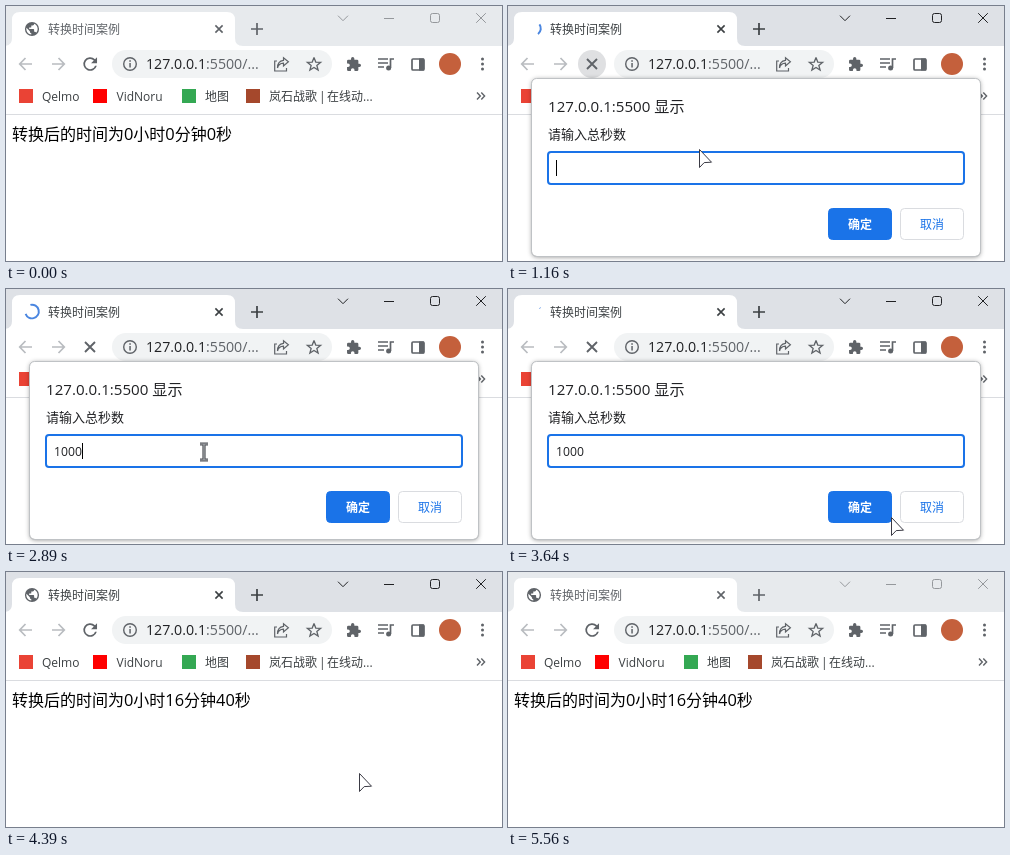
Animation of 496x255 px, one loop 5620 ms. Source, as an HTML page with a canvas:

```html
<!DOCTYPE html>
<html lang="zh-CN">
<head>
<meta charset="utf-8">
<title>转换时间案例</title>
<style>
html, body { margin: 0; width: 100%; height: 100%; overflow: hidden; background: #fff; }
canvas { display: block; width: 496px; height: 255px; }
</style>
</head>
<body>
<canvas id="stage" width="496" height="255"></canvas>
<script>
const c = document.getElementById('stage').getContext('2d');
const LOOP = 5620;
const FONT = '"Open Sans", "Noto Sans CJK SC", "Noto Sans CJK", sans-serif';
const GREY = '#5f6368', DARK = '#202124', BLUE = '#1a73e8', PALE = '#b9bcc0';

// Event times in ms
const AT = { hover: 740, active: 810, load: 930, dialog: 1000, leave: 1300, done: 4290, blur: 5560 };
const KEYS = [2150, 2330, 2520, 2700];
const CLICKS = [[790, 920], [4090, 4230]];

// Pointer path: time, x, y
const PATH = [
  [140, 428, 256], [300, 335, 190], [450, 170, 100], [590, 55, 53], [670, 56, 54],
  [760, 80, 58], [930, 80, 58], [1050, 122, 92], [1160, 191, 143], [1280, 197, 159],
  [1400, 198, 163], [3030, 198, 163], [3220, 270, 180], [3420, 370, 218], [3570, 396, 236],
  [3640, 383, 228], [3850, 364, 214], [4200, 355, 209], [4390, 353, 201], [4770, 349, 205],
  [5000, 349, 205], [5180, 384, 226], [5370, 434, 257]
];

// Icons on a 24-unit grid
const GLOBE = new Path2D('M12 2a10 10 0 1 0 0 20 10 10 0 1 0 0-20z' +
  'M11 19.9C7 19.4 4 16.1 4 12q0-.9.2-1.8L9 15v1q0 2 2 2z' +
  'M17.9 17.4Q17.4 16 16 16h-1v-3q0-1-1-1H8v-2h2q1 0 1-1V7h2q2 0 2-2v-.4C18 5.8 20 8.6 20 12q0 3-2.1 5.4z');
const RELOAD = new Path2D('M17.65 6.35A8 8 0 1 0 19.73 14h-2.08A6 6 0 1 1 16.22 7.78L13 11h7V4z');
const PUZZLE = new Path2D('M20.5 11H19V7q0-2-2-2h-4V3.5a2.5 2.5 0 0 0-5 0V5H4Q2 5 2 7v3.8h1.5' +
  'a2.7 2.7 0 0 1 0 5.4H2V20q0 2 2 2h3.8v-1.5a2.7 2.7 0 0 1 5.4 0V22H17q2 0 2-2v-4h1.5a2.5 2.5 0 0 0 0-5z');

const within = (t, a, b) => t >= a && t < b;

function text(s, x, y, size, color, weight = 400, align = 'left') {
  c.font = `${weight} ${size}px ${FONT}`;
  c.fillStyle = color;
  c.textAlign = align;
  c.fillText(s, x, y);
  return c.measureText(s).width;
}

function rect(x, y, w, h, color) {
  c.fillStyle = color;
  c.fillRect(x, y, w, h);
}

function round(x, y, w, h, r) {
  c.beginPath();
  c.roundRect(x, y, w, h, r);
}

function disc(x, y, r, color) {
  c.beginPath();
  c.arc(x, y, r, 0, Math.PI * 2);
  c.fillStyle = color;
  c.fill();
}

function icon(path, x, y, size) {
  c.save();
  c.translate(x, y);
  c.scale(size / 24, size / 24);
  c.translate(-12, -12);
  c.fillStyle = GREY;
  c.fill(path, 'evenodd');
  c.restore();
}

// Each polyline is [x, y, x, y, ...]
function trace(lines) {
  c.beginPath();
  for (const p of lines) {
    c.moveTo(p[0], p[1]);
    for (let i = 2; i < p.length; i += 2) c.lineTo(p[i], p[i + 1]);
  }
}

function stroke(color, width, ...lines) {
  trace(lines);
  c.strokeStyle = color;
  c.lineWidth = width;
  c.stroke();
}

function arc(x, y, r, from, to, color, width) {
  c.beginPath();
  c.arc(x, y, r, from, to);
  c.strokeStyle = color;
  c.lineWidth = width;
  c.stroke();
}

function cross(x, y, r, color, width) {
  stroke(color, width, [x - r, y - r, x + r, y + r], [x + r, y - r, x - r, y + r]);
}

// cubic-bezier(.4, 0, .2, 1)
function ease(p) {
  let lo = 0, hi = 1;
  for (let i = 0; i < 16; i++) {
    const u = (lo + hi) / 2, v = 1 - u;
    if (1.2 * u * v * v + .6 * u * u * v + u * u * u < p) lo = u; else hi = u;
  }
  return lo * lo * (3 - 2 * lo);
}

// Arc that grows and shrinks while it turns
function spinner(t) {
  const e = 2190 + (t - 1160) * .965, span = 666, max = 270;
  const start = 270 + e * 360 / 1568 + Math.floor(e / (span * 2)) % 4 * max;
  let sweep = max * ease((e % span) / span);
  if (Math.floor(e / span) % 2 === 0) sweep = Math.min(sweep - max, -5);
  else sweep = Math.max(sweep, 5);
  const rad = Math.PI / 180;
  const a = start * rad, b = (start + sweep) * rad;
  arc(26, 22.5, 6.8, Math.min(a, b), Math.max(a, b), '#4a86e0', 2);
}

function tabStrip(t, active, loading) {
  rect(0, 0, 496, 40, active ? '#dee1e6' : '#e7eaed');
  c.beginPath();
  c.moveTo(-2, 40);
  c.quadraticCurveTo(6, 40, 6, 32);
  c.lineTo(6, 14);
  c.quadraticCurveTo(6, 6, 14, 6);
  c.lineTo(221, 6);
  c.quadraticCurveTo(229, 6, 229, 14);
  c.lineTo(229, 32);
  c.quadraticCurveTo(229, 40, 237, 40);
  c.fillStyle = '#fff';
  c.fill();

  if (loading) spinner(t); else icon(GLOBE, 26, 23, 17);
  text('转换时间案例', 42, 27.5, 12, active ? '#3c4043' : GREY);
  cross(213, 23, 3.6, active ? '#3c4043' : GREY, 1.6);
  stroke(active ? '#3c4043' : GREY, 1.7, [245, 23, 257, 23], [251, 17, 251, 29]);

  const ink = active ? DARK : '#95989c';
  stroke(ink, 1, [332, 9.7, 337, 14.7, 342, 9.7]);
  stroke(ink, 1, [378, 12.5, 388, 12.5]);
  round(424.5, 7.5, 9, 9, 2);
  c.stroke();
  cross(475, 12, 4.8, ink, 1);
}

function arrow(x, dir) {
  stroke(PALE, 1.7, [x - 6 * dir, 58, x + 6 * dir, 58],
    [x + .5 * dir, 52, x + 6.3 * dir, 58, x + .5 * dir, 64]);
}

function star(x, y) {
  const p = [];
  for (let i = 0; i < 11; i++) {
    const r = i % 2 ? 3 : 7, a = i * Math.PI / 5 - Math.PI / 2;
    p.push(x + r * Math.cos(a), y + r * Math.sin(a));
  }
  stroke(GREY, 1.3, p);
}

function share() {
  stroke(GREY, 1.2, [271, 55, 268.7, 55, 268.7, 65, 280.5, 65, 280.5, 62]);
  c.beginPath();
  c.moveTo(271.5, 62);
  c.quadraticCurveTo(272.5, 57.5, 277.5, 57.2);
  c.lineTo(277.5, 60);
  c.lineTo(282.4, 55.8);
  c.lineTo(277.5, 51.8);
  c.lineTo(277.5, 54.4);
  c.quadraticCurveTo(271.5, 55, 271.5, 62);
  c.stroke();
}

function toolbar(t, loading) {
  rect(0, 40, 496, 68, '#fff');
  arrow(20, -1);
  arrow(52, 1);
  if (within(t, AT.hover, AT.leave)) disc(84, 58, 14, loading ? '#dfe0e2' : '#eeeff0');
  if (loading) cross(84, 58, 5, GREY, 1.9);
  else icon(RELOAD, 84.2, 58, 20.5);

  round(106, 44, 220, 28, 14);
  c.fillStyle = '#f1f3f4';
  c.fill();
  arc(124, 58, 6.3, 0, 7, GREY, 1.4);
  rect(123.3, 57, 1.5, 4.5, GREY);
  rect(123.3, 54.2, 1.5, 1.6, GREY);
  const w = text('127.0.0.1', 140, 63, 14.2, DARK);
  text(':5500/...', 140 + w, 63, 14.2, GREY);

  share();
  star(308, 58.5);
  icon(PUZZLE, 347.7, 58.3, 16);

  // Media queue
  stroke(GREY, 1.7, [372, 53, 382, 53], [372, 57, 382, 57], [372, 61, 378, 61],
    [384.5, 62, 384.5, 53, 388, 53]);
  disc(382.6, 62, 2.5, GREY);

  // Side panel
  round(406, 53, 12, 11, 1);
  c.lineWidth = 1.7;
  c.stroke();
  rect(413, 52.5, 5, 12, GREY);

  disc(444, 58, 11, '#c4603c');
  for (const y of [53, 58, 63]) disc(476.5, y, 1.5, GREY);
}

function bookmarks() {
  rect(13, 83, 14, 14, '#ea4335');
  text('Qelmo', 36, 95, 12, '#3c4043');
  rect(87, 83, 14, 14, '#f00');
  text('VidNoru', 110.5, 95, 12, '#3c4043');
  rect(176, 83, 14, 14, '#34a853');
  text('地图', 199, 95, 12, '#3c4043');
  rect(240, 83, 14, 14, '#a5482c');
  text('岚石战歌', 263, 95, 12, '#3c4043');
  text('|', 313, 95, 12, '#3c4043');
  text('在线动...', 321, 95, 12, '#3c4043');
  stroke(GREY, 1.4, [471, 86.5, 474.3, 90, 471, 93.5], [475.3, 86.5, 478.6, 90, 475.3, 93.5]);
  rect(0, 108, 496, 1, '#dadce0');
}

// Digits are set a touch larger than the characters around them
function result(s) {
  const line = `转换后的时间为${Math.floor(s / 3600)}小时${Math.floor(s / 60) % 60}分钟${s % 60}秒`;
  let x = 6;
  for (const run of line.match(/\d+|\D+/g)) x += text(run, x, 134, /\d/.test(run) ? 16.4 : 16, '#000');
}

function button(x, label, back, edge, ink, weight) {
  round(x + .5, 202.5, 63, 31, 4);
  c.fillStyle = back;
  c.fill();
  c.strokeStyle = edge;
  c.lineWidth = 1;
  c.stroke();
  text(label, x + 32, 222.5, 12, ink, weight, 'center');
}

function dialog(t) {
  c.save();
  c.shadowColor = 'rgba(0,0,0,.45)';
  c.shadowBlur = 5;
  c.shadowOffsetY = 1;
  round(24, 72.5, 448, 177.5, 5);
  c.fillStyle = '#fff';
  c.fill();
  c.restore();
  round(23.5, 72.5, 449, 178, 5);
  c.strokeStyle = '#bfc2c5';
  c.lineWidth = 1;
  c.stroke();

  text('127.0.0.1:5500 显示', 40, 106, 15.1, DARK);
  text('请输入总秒数', 40, 133, 13, DARK);
  round(40, 146, 416, 32, 3);
  c.strokeStyle = BLUE;
  c.lineWidth = 2;
  c.stroke();

  const typed = KEYS.filter(k => t >= k);
  const w = text('1000'.slice(0, typed.length), 48, 167, 12.2, DARK);
  const since = t - (typed.length ? typed[typed.length - 1] : AT.dialog);
  if (since % 1060 < 530) rect(48 + Math.round(w), 154, 1, 16, '#000');

  button(320, '确定', BLUE, BLUE, '#fff', 700);
  button(392, '取消', '#fff', '#dadce0', BLUE, 500);
}

// Monotone cubic between the path points
function pointerAt(t) {
  const last = PATH.length - 1;
  if (t < PATH[0][0] || t > PATH[last][0]) return null;
  let i = 0;
  while (i < last - 1 && t >= PATH[i + 1][0]) i++;
  const a = PATH[i], b = PATH[i + 1], dt = b[0] - a[0], u = (t - a[0]) / dt;
  const slope = (n, k) => {
    if (n < 1 || n >= last) return 0;
    const l = (PATH[n][k] - PATH[n - 1][k]) / (PATH[n][0] - PATH[n - 1][0]);
    const r = (PATH[n + 1][k] - PATH[n][k]) / (PATH[n + 1][0] - PATH[n][0]);
    return l * r > 0 ? 2 * l * r / (l + r) : 0;
  };
  return [1, 2].map(k => {
    const v = 1 - u;
    return a[k] * v * v * (1 + 2 * u) + b[k] * u * u * (3 - 2 * u)
      + dt * u * v * (v * slope(i, k) - u * slope(i + 1, k));
  });
}

function beam(x, y) {
  const bars = [[x - 4, y - 8, x + 4, y - 8], [x, y - 8, x, y + 8], [x - 4, y + 8, x + 4, y + 8]];
  stroke('#4c4f54', 3.2, ...bars);
  stroke('#a9acb0', 1.2, ...bars);
}

function arrowhead(x, y) {
  c.lineJoin = 'round';
  trace([[x + .5, y + .5, x + .5, y + 18.5, x + 5.2, y + 13.6, x + 12.5, y + 13.2]]);
  c.closePath();
  c.fillStyle = '#fff';
  c.fill();
  c.strokeStyle = '#3a3a44';
  c.lineWidth = 1;
  c.stroke();
  c.lineJoin = 'miter';
}

function pointer(t, asking) {
  const p = pointerAt(t);
  if (!p) return;
  const [x, y] = p.map(Math.round);
  if (asking && within(x, 39, 457) && within(y, 145, 179)) beam(x, y);
  else arrowhead(x, y);
  if (CLICKS.some(([a, b]) => within(t, a, b))) {
    c.globalCompositeOperation = 'multiply';
    disc(x + 2, y, 12.5, '#f8f062');
    c.globalCompositeOperation = 'source-over';
  }
}

function draw(t) {
  const loading = within(t, AT.load, AT.done);
  const asking = within(t, AT.dialog, AT.done);
  rect(0, 0, 496, 255, '#fff');
  tabStrip(t, within(t, AT.active, AT.blur), loading);
  toolbar(t, loading);
  bookmarks();
  if (!loading) result(t < AT.load ? 0 : 1000);
  if (asking) dialog(t);
  pointer(t, asking);
}

const begin = performance.now();
function frame() {
  draw((performance.now() - begin) % LOOP);
  requestAnimationFrame(frame);
}
draw(0);
requestAnimationFrame(frame);
</script>
</body>
</html>
```
